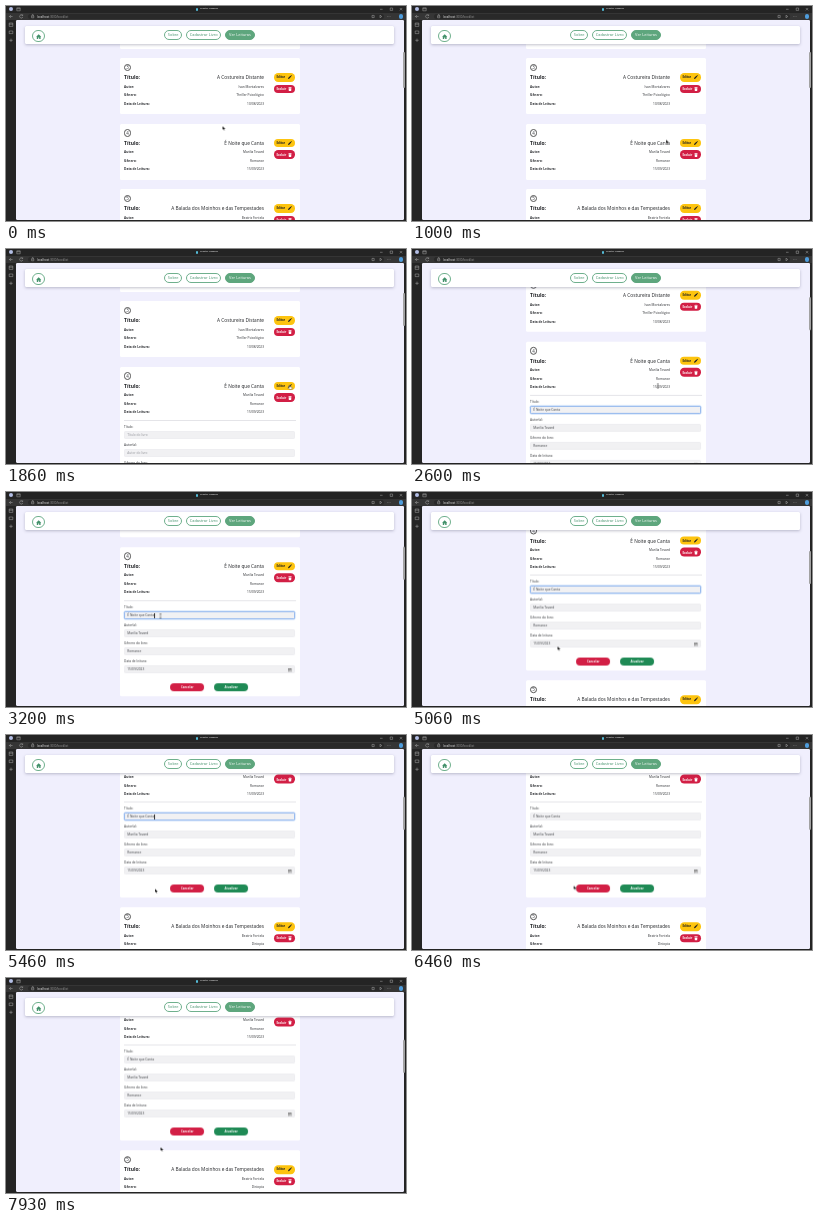
Animation, 400 px wide and 215 px high, one loop 8000 ms. Source, as an HTML page:

```html
<!DOCTYPE html>
<html lang="pt-BR">
<head>
<meta charset="utf-8">
<title>Chapter Logbook</title>
<style>
html, body { margin: 0; width: 100%; height: 100%; overflow: hidden; background: #242424; }
#stage { position: relative; width: 400px; height: 215px; overflow: hidden; font: 3.2px/0 "Open Sans", "Noto Sans", sans-serif; color: #2b2d31; }
#stage div, #stage span, #stage svg { position: absolute; box-sizing: border-box; }
span { white-space: nowrap; }
svg { overflow: visible; }
b { font-weight: 700; }

.toolbar { left: 0; top: 7px; width: 400px; height: 7px; background: #353535; }
.address { left: 22px; top: 7.8px; width: 356px; height: 5.4px; border-radius: 2.7px; background: #292929; }
.tab { left: 194px; top: 3.3px; font: 2.4px/0 Lato, sans-serif; color: #eee; }
.url { left: 31px; top: 10.5px; font-size: 2.9px; color: #999; }
.url b { font-weight: 500; color: #f0f0f0; }
.dot { border-radius: 50%; }

.view { left: 10.4px; top: 14.4px; width: 387.4px; height: 199.4px; overflow: hidden; background: #f0effd; border-radius: 1.5px; }
/* children of the view use stage coordinates */
.stage { left: -10.4px; top: -14.4px; width: 400px; height: 400px; }
.page { animation: scroll 8s linear infinite; }
.thumb { left: 397px; width: 2px; border-radius: 1px; background: #a2a2a2; animation: thumb 8s step-end infinite, drag 8s linear infinite; }

.cover { left: 10px; top: 14px; width: 388px; height: 6px; background: #f0effd; }
.nav { left: 19px; top: 20px; width: 369px; height: 18px; background: #fff; border-radius: 1.5px; box-shadow: 0 1px 3px #5a5a7860; }
.pill { top: 3.5px; height: 10.8px; border: .5px solid #6fb08d; border-radius: 5.4px; color: #42916a; font-size: 3.95px; font-weight: 500; }
.pill.on { background: #5ea67d; border-color: #5ea67d; color: #fff; }
.home { left: 7.4px; top: 3.8px; width: 12.4px; height: 12.4px; border: .5px solid #6fb08d; border-radius: 50%; }
.mid { left: 50%; top: 50%; transform: translateX(-50%); }

.card { left: 113.5px; width: 180.5px; height: 56px; background: #fff; border-radius: 1.5px; overflow: hidden; }
.open { animation: grow 8s step-end infinite; }
.below { animation: push 8s step-end infinite; }
.num { left: 4.2px; top: 5.4px; width: 7.6px; height: 7.6px; border: .4px solid #555; border-radius: 50%; font-size: 4.4px; }
.key { left: 4.6px; font-weight: 700; }
.val { right: 36px; }
.big { font-size: 4.75px; color: #1f2124; }
.key.big { font-size: 5px; }
.btn { height: 8.4px; border-radius: 4.2px; font-size: 2.9px; font-weight: 700; color: #fff; }
.side { left: 154px; width: 21px; }
.side span { left: 3px; top: 4.2px; }
.side svg { left: 14.2px; top: 2.2px; width: 4px; height: 4px; }
.edit { background: #fdc40f; color: #222; }
.del { background: #d21f45; }
.save { background: #1f8a55; }

.form { left: 0; top: 0; width: 100%; height: 149.5px; animation: show 8s step-end infinite; }
.rule { left: 4.6px; top: 53.5px; width: 171.5px; height: .4px; background: #e4e4e8; }
.label { left: 4.6px; }
.field { left: 4.4px; width: 171.4px; height: 8.6px; border: .3px solid #eeeef1; border-radius: 1.2px; background: #f1f1f3; }
.field span { left: 2.4px; top: 3.5px; }
.field svg { right: 3px; top: 2.1px; width: 3.6px; height: 3.6px; color: #777; }
.focus { animation: focus 8s step-end infinite; }
.hint { color: #96989d; animation: hint 8s step-end infinite; }
.text { color: #3a3c40; animation: text 8s step-end infinite; }
.text i { position: absolute; left: 100%; top: -1.9px; width: .5px; height: 4.4px; background: #333; animation: caret 8s step-end infinite; }

.mouse { left: 0; top: 0; animation: mouse 8s linear infinite; }
.mouse svg { left: 0; top: 0; width: 4px; height: 5px; }
.arrow { animation: arrow 8s step-end infinite; }
.beam { animation: beam 8s step-end infinite; }
.hand { animation: hand 8s step-end infinite; }

@keyframes scroll {
  0%, 30.6% { transform: none; }
  32.5% { transform: translateY(-25px); }
  34% { transform: translateY(-47px); }
  36.25%, 61% { transform: translateY(-62.8px); }
  63.25% { transform: translateY(-88.4px); }
  64.6% { transform: translateY(-99px); }
  66.5%, 100% { transform: translateY(-104.5px); }
}
@keyframes drag {
  0%, 30.6% { transform: none; }
  32.5% { transform: translateY(4.2px); }
  36.25%, 61% { transform: translateY(10.7px); }
  63.25% { transform: translateY(15px); }
  66.5%, 100% { transform: translateY(17.8px); }
}
@keyframes thumb { 0% { top: 46px; height: 36px; } 21.625%, 100% { top: 43.5px; height: 33.5px; } }
@keyframes grow { 0% { height: 56px; } 21.625%, 100% { height: 149.5px; } }
@keyframes show { 0% { opacity: 0; } 21.625%, 100% { opacity: 1; } }
@keyframes push { 0% { transform: none; } 21.625%, 100% { transform: translateY(93.7px); } }
@keyframes hint { 0% { opacity: 1; } 25%, 100% { opacity: 0; } }
@keyframes text { 0% { opacity: 0; } 25%, 100% { opacity: 1; } }
@keyframes focus {
  0%, 74.125%, 100% { border-color: #eeeef1; box-shadow: none; }
  25% { border-color: #94b8ee; box-shadow: 0 0 0 .4px #bcd5f8; }
}
@keyframes caret {
  0%, 43.75%, 56.25%, 69.5%, 100% { opacity: 0; }
  37.5%, 50%, 63.5% { opacity: 1; }
}
@keyframes mouse {
  0%, .75% { transform: translate(216.5px, 120px); }
  5.75%, 7.5% { transform: translate(230px, 128px); }
  17.5% { transform: translate(278px, 139px); }
  19.1%, 27.5% { transform: translate(283.5px, 136px); }
  32.5% { transform: translate(246px, 137px); }
  38.25% { transform: translate(171px, 126px); }
  40%, 52.5% { transform: translate(154.5px, 124px); }
  58% { transform: translate(150px, 146px); }
  62.5%, 64% { transform: translate(145.5px, 154.2px); }
  73.25%, 78.25% { transform: translate(153px, 153px); }
  80.75% { transform: translate(161.5px, 150.5px); }
  84% { transform: translate(184px, 153px); }
  88.25% { transform: translate(224px, 154px); }
  92.5%, 95% { transform: translate(190px, 164px); }
  99%, 100% { transform: translate(154.5px, 169px); }
}
@keyframes arrow {
  0%, 27.8%, 57.5%, 85.8%, 89.8%, 100% { opacity: 1; }
  17.2%, 31.5%, 81.4%, 86.4% { opacity: 0; }
}
@keyframes beam { 0%, 57.5%, 100% { opacity: 0; } 31.5% { opacity: 1; } }
@keyframes hand { 0%, 27.8%, 85.8%, 89.8%, 100% { opacity: 0; } 17.2%, 81.4%, 86.4% { opacity: 1; } }
</style>
</head>
<body>
<div id="stage">
  <div class="dot" style="left:2.5px;top:1px;width:4.4px;height:4.4px;background:#b4bfe6"></div>
  <svg width="400" height="14" style="left:0;top:0;z-index:1" fill="none" stroke="#c8c8c8" stroke-width=".4">
    <path d="M10.8 1.8h3.4v3h-3.4zM10.8 2.7h3.4M374 3.3h2.6M384.2 2h2.4v2.4h-2.4zM393.8 2l2.4 2.4m0-2.4l-2.4 2.4"/>
    <path d="M6.6 10.5H3.4l1.5-1.5m-1.5 1.5L4.9 12M16.6 9.3a1.7 1.7 0 1 0 .3 1.7M16.7 8.4v1.2h-1.2M25.6 10h2.2v1.8h-2.2zM26 10V9.2a.7.7 0 0 1 1.4 0V10"/>
    <path d="M366 9.4h2.2v2.2H366zM374 9.2l1.8 1.3-1.8 1.3zM381.5 10.5h.5m.7 0h.5m.7 0h.5"/>
  </svg>
  <div class="dot" style="left:189.5px;top:2px;width:2.6px;height:2.6px;background:#55bcd8"></div>
  <span class="tab">Chapter Logbook</span>
  <div class="toolbar"></div>
  <div class="address"></div>
  <span class="url"><b>localhost</b>:3000/booklist</span>
  <div class="dot" style="left:393.3px;top:8.4px;width:4.2px;height:4.2px;background:#4e9ddd"></div>
  <svg width="11" height="40" style="left:0;top:0" fill="none" stroke="#c8c8c8" stroke-width=".4">
    <path d="M3.2 17h3.6v3.4H3.2zM3.2 18.2h3.6M3.2 25h3.6v2.6H3.2zM5 32.6v3.4m-1.7-1.7h3.4"/>
  </svg>

  <div class="view">
    <div class="stage page" id="page"></div>
    <div class="stage">
      <div class="cover"></div>
      <div class="nav">
        <div class="home">
          <svg viewBox="0 0 10 10" style="left:3px;top:2.8px;width:5.4px;height:5.4px"><path fill="#42916a" d="M5 .5L.2 5h1.3v4.5h2.6V6.4h1.8v3.1h2.6V5h1.3z"/></svg>
        </div>
        <div class="pill" style="left:139px;width:18.4px"><span class="mid">Sobre</span></div>
        <div class="pill" style="left:161px;width:35.4px"><span class="mid">Cadastrar Livro</span></div>
        <div class="pill on" style="left:200px;width:30px"><span class="mid">Ver Leituras</span></div>
      </div>
    </div>
  </div>
  <div class="thumb"></div>

  <div class="mouse">
    <svg class="arrow" viewBox="0 0 4 5"><path d="M0 0v3.9l.9-.8.7 1.5.7-.3-.7-1.4h1.3z" fill="#111" stroke="#fff" stroke-width=".2"/></svg>
    <svg class="beam" viewBox="0 0 4 5"><path d="M-.8-2.2h1.6M0-2.2v4.4M-.8 2.2H.8" fill="none" stroke="#222" stroke-width=".45"/></svg>
    <svg class="hand" viewBox="0 0 4 5"><path d="M-.4.4a.4.4 0 0 1 .9 0v1.4l1.7.4q.5.2.4.7L2.2 4.6H.1L-1.3 2.8q.2-.6.9 0z" fill="#fff" stroke="#111" stroke-width=".35"/></svg>
  </div>
</div>
<script>
const icon = d => `<svg viewBox="0 0 10 10"><path fill="currentColor" d="${d}"/></svg>`;
const pencil = icon("M0 10l.8-3L6 1.8 8.2 4 3 9.2zM6.7 1.1L7.8 0 10 2.2 8.9 3.3z");
const trash = icon("M.8 1h2.6L4 0h2l.6 1h2.6v1.3H.8zM1.5 3h7l-.6 7H2.1z");
const calendar = icon("M0 1h2V0h1v1h4V0h1v1h2v9H0zM1 4v5h8V4zM2 5h2v1H2zm3 0h2v1H5zM2 7h2v1H2zm3 0h2v1H5z")
  .replace("<path", '<path fill-rule="evenodd"');

const row = (key, val, y, cls = "") =>
  `<span class="key ${cls}" style="top:${y}px">${key}:</span><span class="val ${cls}" style="top:${y}px">${val}</span>`;

const field = ([label, hint, val, extra = "", cls = ""], i) => `
  <span class="label" style="top:${60.3 + i * 18}px">${label}:</span>
  <div class="field ${cls}" style="top:${64 + i * 18}px">
    <span class="hint">${hint}</span><span class="text">${val}</span>${extra}
  </div>`;

const action = (name, x, cls) =>
  `<div class="btn ${cls}" style="left:${x}px;top:135.8px;width:34px"><span class="mid">${name}</span></div>`;

const form = b => `<div class="form"><div class="rule"></div>` + [
  ["Título", "Título do livro", b.title + "<i></i>", "", "focus"],
  ["Autor(a)", "Autor do livro", b.author],
  ["Gênero do livro", "Gênero do livro", b.genre],
  ["Data de leitura", "dd/mm/aaaa", b.date, calendar]
].map(field).join("") + action("Cancelar", 50.7, "del") + action("Atualizar", 94.7, "save") + "</div>";

const card = (b, y, cls = "", extra = "") => `
  <div class="card ${cls}" style="top:${y}px">
    <div class="num"><span class="mid">${b.num}</span></div>
    ${row("Título", b.title, 19, "big")}
    ${row("Autor", b.author, 28.5)}
    ${row("Gênero", b.genre, 37)}
    ${row("Data de Leitura", b.date, 45.3)}
    <div class="btn side edit" style="top:15px"><span>Editar</span>${pencil}</div>
    <div class="btn side del" style="top:26.7px"><span>Excluir</span>${trash}</div>
    ${extra}
  </div>`;

const books = [
  { num: 3, title: "A Costureira Distante", author: "Ivan Montalvares", genre: "Thriller Psicológico", date: "10/08/2023" },
  { num: 4, title: "É Noite que Canta", author: "Marilia Tovard", genre: "Romance", date: "15/09/2023" },
  { num: 5, title: "A Balada dos Moinhos e das Tempestades", author: "Beatriz Fontela", genre: "Distopia", date: "02/10/2023" }
];
document.getElementById("page").innerHTML =
  `<div class="card" style="top:-13.5px"></div>` +
  card(books[0], 52.3) +
  card(books[1], 117.8, "open", form(books[1])) +
  card(books[2], 183.3, "below");
</script>
</body>
</html>
```
